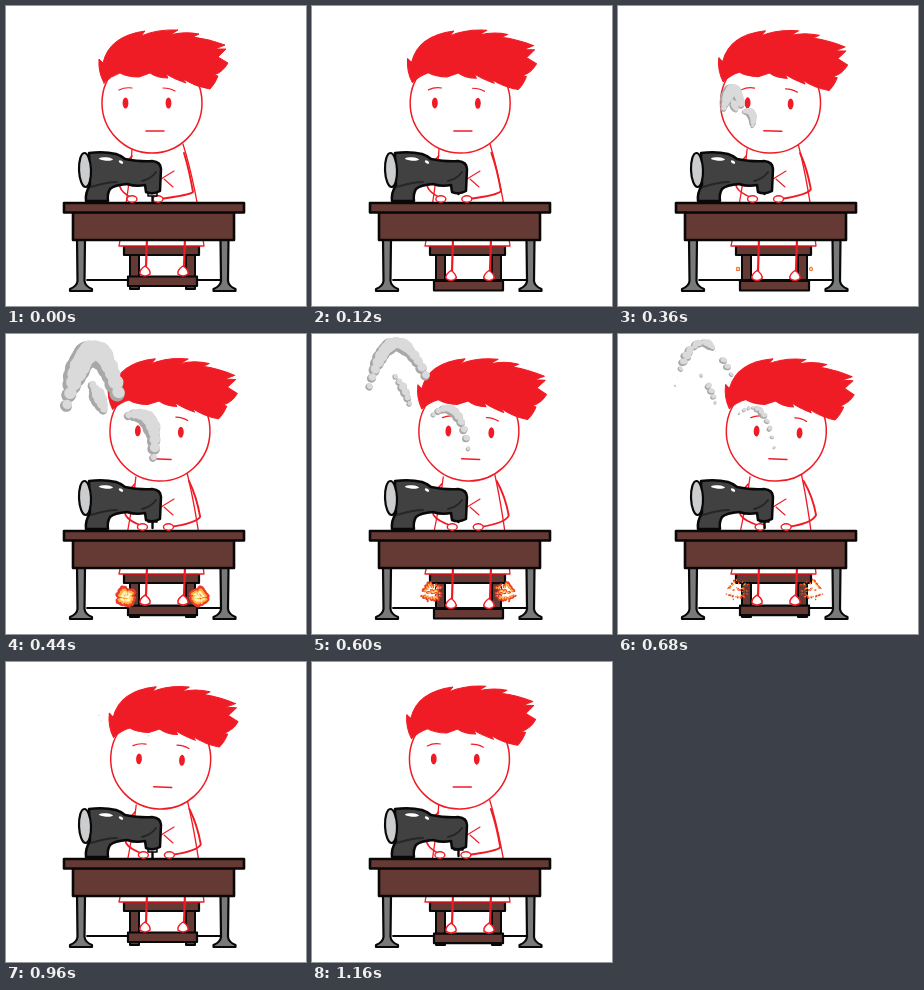
Animation of 300x300 px, one loop 1200 ms. Source, as an HTML page with a canvas:

```html
<!DOCTYPE html>
<html lang="en">
<head>
<meta charset="utf-8">
<title>Sewing</title>
<style>
html, body { margin: 0; width: 100%; height: 100%; overflow: hidden; background: #fff; }
canvas { display: block; width: 100vw; height: 100vh; }
</style>
</head>
<body>
<canvas id="stage"></canvas>
<script>
const LOOP = 1200, STEP = 40, STITCH = 240, PEAK = 800;
const RED = '#f01c25', WOOD = '#663a34', INK = '#080808';
const canvas = document.getElementById('stage');
const c = canvas.getContext('2d');

const lerp = (a, b, k) => a + (b - a) * k;
const span = (t, a, b) => Math.max(0, Math.min(1, (t - a) / (b - a)));
const bend = (a, b, d, u) => lerp(lerp(a, b, u), lerp(b, d, u), u);

function seeded(seed) {
  return () => (seed = seed * 16807 % 2147483647) / 2147483647;
}
function paint(path, fill, stroke, width = 2.6) {
  const p = typeof path === 'string' ? new Path2D(path) : path;
  if (fill) { c.fillStyle = fill; c.fill(p); }
  if (stroke) { c.strokeStyle = stroke; c.lineWidth = width; c.stroke(p); }
}
function oval(x, y, rx, ry, fill, stroke, width, turn = 0) {
  const p = new Path2D();
  p.ellipse(x, y, rx, ry, turn, 0, 7);
  paint(p, fill, stroke, width);
}
function box(x, y, w, h, fill, width) {
  const p = new Path2D();
  p.rect(x, y, w, h);
  paint(p, fill, INK, width);
}

const HAIR = 'M98 77 Q92 66 93 53 L97 57 Q103 30 139 25 L135 30 Q151 23 172 24 L164 29 ' +
  'Q178 25 193 28 L187 31 Q203 33 219 39 L209 43 L220 43 L212 51 L222 57 Q217 66 208 69 ' +
  'L212 70 Q209 78 204 83 Q190 81 177 73 L180 77 Q168 73 160 68 L162 72 Q151 72 144 67 ' +
  'L133 71 Q121 71 114 67 Q105 70 98 77 Z';

const MACHINE = 'M83 147 Q98 145 110 148 Q116 150 119 153 Q135 156 146 155 Q155 156 155 163 ' +
  'L154 185 Q147 189 140 186 L139 179 Q130 181 121 178 Q108 179 104 183 Q101 188 102 195 ' +
  'H80 Q79 187 84 179 Z';

// Each plume is a curve (start, bend, end) that drifts from "thick" to "thin".
const PLUMES = [
  { count: 18, wide: 13, thick: [60, 72, 84, -28, 111, 60], thin: [57, 53, 78, -26, 113, 42] },
  { count: 6, wide: 8, thick: [86, 52, 92, 65, 97, 76], thin: [83, 43, 93, 56, 97, 70] },
  { count: 11, wide: 8, thick: [122, 82, 152, 76, 147, 124], thin: [121, 81, 146, 60, 156, 115] }
];

const rand = seeded(77);
const PUFFS = PLUMES.flatMap(({ count, wide, thick, thin }) =>
  Array.from({ length: count }, (_, i) => {
    const u = i / (count - 1);
    const at = ([x, y, bx, by, ex, ey]) => [bend(x, bx, ex, u), bend(y, by, ey, u)];
    return {
      from: at(thick), to: at(thin),
      r: wide * (.55 + .45 * Math.sin(u * Math.PI)) * (.85 + .3 * rand()),
      end: 680 + 380 * rand(),
      turn: rand() * 3
    };
  }));

const BITS = Array.from({ length: 30 }, (_, i) => ({
  angle: i * 2.4, far: Math.sqrt(rand()), size: .6 + .8 * rand()
}));

function stool(drop) {
  for (const x of [124, 180]) box(x, 248, 9, 35, WOOD, 2);
  box(118, 240, 75, 9, WOOD, 2.2);
  paint('M81 274 H216', null, INK, 1.8);
  box(122, 270.5 + drop, 69, 9.5, WOOD, 2.2);
}

function torso(k) {
  const s = 7 * k;
  paint(`M${126 + s} 143 Q${124 + s / 2} 180 113 240 H198 Q${190 + s / 3} 180 ${177 + s} 138`, '#fff', RED, 1.3);
  paint('M168 165 L155 173 M158 173 L167 181', null, RED, 1.1);
}

function arms(k) {
  const h = 19 * k;
  const ex = 187 + 13 * k, ey = 186 - 6 * k;
  paint(`M${178 + 9 * k} 147 Q${183 + 14 * k} 163 ${ex} ${ey} Q${ex - 3} 189 ${154 + h} 193`, null, RED, 1.9);
  paint(`M${126 + 5 * k} 150 Q${113 + 5 * k} 163 ${114 + 10 * k} 181 Q${116 + 12 * k} 187 ${126 + h} 192`, null, RED, 1.7);
  for (const x of [126, 152]) oval(x + h, 193, 5, 3.2, '#fff', RED, 1.4);
}

function legs(drop) {
  for (const x of [140, 178]) {
    paint(`M${x + 1} 232 L${x} ${261 + drop}`, null, RED, 2.2);
    paint(`M${x - 1} ${260 + drop} q-6 4 -5 8 q5 4 10 0 q1 -4 -5 -8 z`, '#fff', RED, 1.5);
  }
}

function head(k) {
  c.save();
  c.translate(146 + 11.6 * k, 147);
  c.rotate(.058 * k);
  c.translate(-146, -147);
  oval(146, 97, 50, 50, '#fff', RED, 1.5);
  c.save();
  c.translate(8 * k, k);
  for (const x of [119.5, 162.5]) oval(x, 97, 2.9, 5.5, RED);
  paint('M113 84 Q119 81 126 82 M157 82 Q164 82 169 85', null, RED, 1.2);
  c.restore();
  paint('M140 125 H158', null, RED, 1.5);
  paint(HAIR, RED, RED, 1);
  c.restore();
}

function table() {
  for (const x of [75, 218.5]) {
    paint(`M${x - 4} 233 H${x + 4} L${x + 3.5} 275 Q${x + 4} 280 ${x + 11} 283 V285 H${x - 11} V283 Q${x - 4} 280 ${x - 3.5} 275 Z`,
      '#77797a', INK, 2.2);
  }
  box(67, 206, 161, 28, WOOD);
  box(58, 197, 180, 9.5, WOOD);
}

function machine(lift) {
  const n = -8 * lift;
  paint(`M146.5 ${185 + n} V${196 + n}`, null, INK, 2.4);
  box(142, 185 + n, 9, 5, '#c4c6c7', 1.5);
  paint(MACHINE, '#414142', INK, 2.5);
  paint('M85 181 Q101 176 111 176 M136 175 Q145 173 150 166', null, '#262626', 2);
  oval(79, 164, 6, 17, '#cbcdce', INK, 2.2, -.04);
  oval(100, 153, 7, 1.7, '#fff', null, 0, .08);
  oval(115, 156, 2.4, 1.3, '#fff', null, 0, .5);
}

function sparks(t) {
  const grow = span(t, 340, 440), fade = span(t, 440, 780);
  if (!grow || fade === 1) return;
  const layer = (x, y, dir, reach, size, fill) => {
    for (const b of BITS) {
      const d = reach * b.far * grow, r = size * b.size * grow * (1 - fade);
      oval(x + dir * d * Math.cos(b.angle), y + d * Math.sin(b.angle) * .85, r * 1.5, r, fill, null, 0, b.angle);
    }
  };
  for (const [x, dir] of [[120, 1], [193, -1]]) {
    const y = 263 - 10 * fade, reach = 9 + 6 * fade;
    layer(x, y, dir, reach, 2.8, '#ee3a2a');
    layer(x, y, dir, reach * .9, 1.5, '#ffb43c');
    layer(x, y, dir, reach * .7, .8, '#fff6c8');
  }
}

function smoke(t) {
  const grow = span(t, 320, 440), part = span(t, 440, 600);
  if (!grow) return;
  const live = PUFFS.filter(p => t < p.end).map(p => ({
    x: lerp(128, lerp(p.from[0], p.to[0], part), grow),
    y: lerp(118, lerp(p.from[1], p.to[1], part), grow) - 6 * span(t, 600, 1000),
    r: p.r * lerp(.3, 1, grow) * lerp(1, .6, part) * (1 - span(t, 600, p.end)) ** 1.2,
    flat: lerp(.95, .5, span(t, 600, 800)),
    turn: p.turn
  }));
  for (const p of live) oval(p.x, p.y, p.r, p.r * p.flat, '#a8a8a8', null, 0, p.turn);
  for (const p of live) {
    oval(p.x + p.r * .2, p.y - p.r * .25, p.r * .82, p.r * .8 * p.flat, '#dadada', null, 0, p.turn);
  }
}

function draw(t) {
  const k = t < PEAK ? t / PEAK : (LOOP - t) / (LOOP - PEAK);
  const lift = (1 - Math.cos(t / STITCH * 2 * Math.PI)) / 2;
  const drop = 4.5 * lift;
  c.fillStyle = '#fff';
  c.fillRect(0, 0, 300, 300);
  stool(drop);
  torso(k);
  legs(drop);
  table();
  arms(k);
  head(k);
  machine(lift);
  sparks(t);
  smoke(t);
}

function fit() {
  const ratio = window.devicePixelRatio || 1;
  canvas.width = Math.round(innerWidth * ratio);
  canvas.height = Math.round(innerHeight * ratio);
  c.setTransform(canvas.width / 300, 0, 0, canvas.height / 300, 0, 0);
  c.lineCap = c.lineJoin = 'round';
}

const start = performance.now();
function tick() {
  const t = (performance.now() - start) % LOOP;
  draw(Math.floor(t / STEP) * STEP);
  requestAnimationFrame(tick);
}
addEventListener('resize', fit);
fit();
tick();
</script>
</body>
</html>
```
